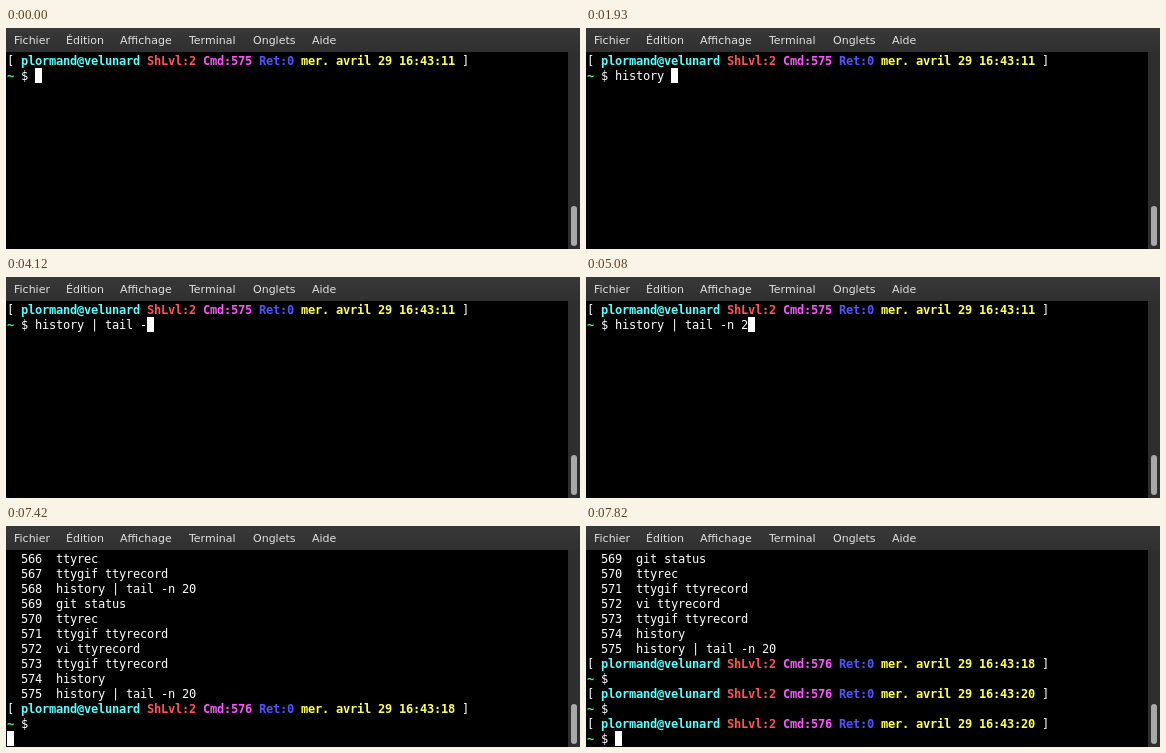
Recreate the animation shown at these times as an HTML page. Size 574x221 px, loop 7990 ms.

```html
<!DOCTYPE html>
<html lang="fr">
<head>
<meta charset="utf-8">
<title>Terminal</title>
<style>
  html, body { margin: 0; width: 574px; height: 221px; overflow: hidden; background: #000; }
  body { position: relative; }
  #menu { position: absolute; inset: 0 0 auto; height: 24px; background: linear-gradient(#383838, #303030); }
  #menu span {
    position: absolute; top: 6px; color: #e0e0e0; white-space: pre;
    font: 11px/13px "DejaVu Sans", sans-serif;
  }
  #track { position: absolute; left: 562px; top: 24px; width: 12px; height: 197px; background: #2e2e2e; }
  #thumb { position: absolute; left: 3px; top: 154px; width: 6px; height: 40px; border-radius: 3px; background: #a9a9a9; }
  #screen { position: absolute; left: 1px; top: 25px; width: 561px; height: 196px; }
  #cursor { position: absolute; width: 7px; height: 15px; background: #fff; }
  .row {
    height: 15px; color: #fff; white-space: pre;
    font: 12px/16px "DejaVu Sans Mono", monospace; letter-spacing: calc(7px - 1ch);
  }
  b { font-weight: 700; }
  .cyan { color: #54ffff; }
  .red { color: #ff5454; }
  .pink { color: #ff54ff; }
  .blue { color: #5454ff; }
  .yellow { color: #ffff54; }
  .green { color: #54ff54; }
</style>
</head>
<body>
<div id="menu">
  <span style="left:8px">Fichier</span>
  <span style="left:60px">Édition</span>
  <span style="left:114px">Affichage</span>
  <span style="left:183px">Terminal</span>
  <span style="left:247px">Onglets</span>
  <span style="left:306px">Aide</span>
</div>
<div id="screen"><div id="cursor"></div><div id="rows"></div></div>
<div id="track"><div id="thumb"></div></div>
<script>
  const LOOP = 7990, ROWS = 13, CELL_W = 7, CELL_H = 15;
  const COMMAND = 'history | tail -n 20';
  const KEY_TIMES = [500, 600, 700, 850, 990, 1170, 1430, 1930, 2350, 2600,
    3260, 3490, 3700, 3770, 3990, 4120, 4400, 4620, 5080, 5290];
  // [time, log line holding the cursor, cursor column]
  const STEPS = [[0, 1, 4], [5590, 2, 0], [5690, 22, 0], [5790, 23, 4],
    [7420, 24, 0], [7520, 25, 4], [7720, 26, 0], [7820, 27, 4]];

  const bold = (color, text) => `<b class="${color}">${text}</b>`;
  const header = (cmd, sec) => '[ ' + [
    bold('cyan', 'plormand@velunard'), bold('red', 'ShLvl:2'), bold('pink', 'Cmd:' + cmd),
    bold('blue', 'Ret:0'), bold('yellow', 'mer. avril 29 16:43:' + sec)
  ].join(' ') + ' ]';
  const prompt = bold('green', '~') + ' $ ';

  const record = 'ttygif ttyrecord', status = 'git status';
  const recent = [record, status, 'ttyrec', record, COMMAND, status, 'ttyrec',
    record, 'vi ttyrecord', record, 'history', COMMAND];
  const past = [...recent.slice(0, 8), ...recent].map((cmd, i) => `  ${556 + i}  ${cmd}`);
  const log = [header(575, 11), prompt, ...past, header(576, 18), prompt,
    header(576, 20), prompt, header(576, 20), prompt];

  const rows = document.getElementById('rows');
  const cursor = document.getElementById('cursor');
  let shown = '';

  function draw(now) {
    const t = now % LOOP;
    const typed = KEY_TIMES.filter(k => k <= t).length;
    const [, line, startCol] = STEPS.filter(s => s[0] <= t).pop();
    const key = line + ':' + typed;
    if (key !== shown) {
      shown = key;
      const top = Math.max(0, line - ROWS + 1);
      const col = line === 1 ? startCol + typed : startCol;
      rows.innerHTML = log.slice(top, startCol ? line + 1 : line).map((text, i) =>
        `<div class="row">${text}${top + i === 1 ? COMMAND.slice(0, typed) : ''}</div>`).join('');
      cursor.style.left = col * CELL_W + 'px';
      cursor.style.top = (line - top) * CELL_H + 'px';
    }
  }

  const start = performance.now();
  function tick() {
    draw(performance.now() - start);
    requestAnimationFrame(tick);
  }
  tick();
</script>
</body>
</html>
```
